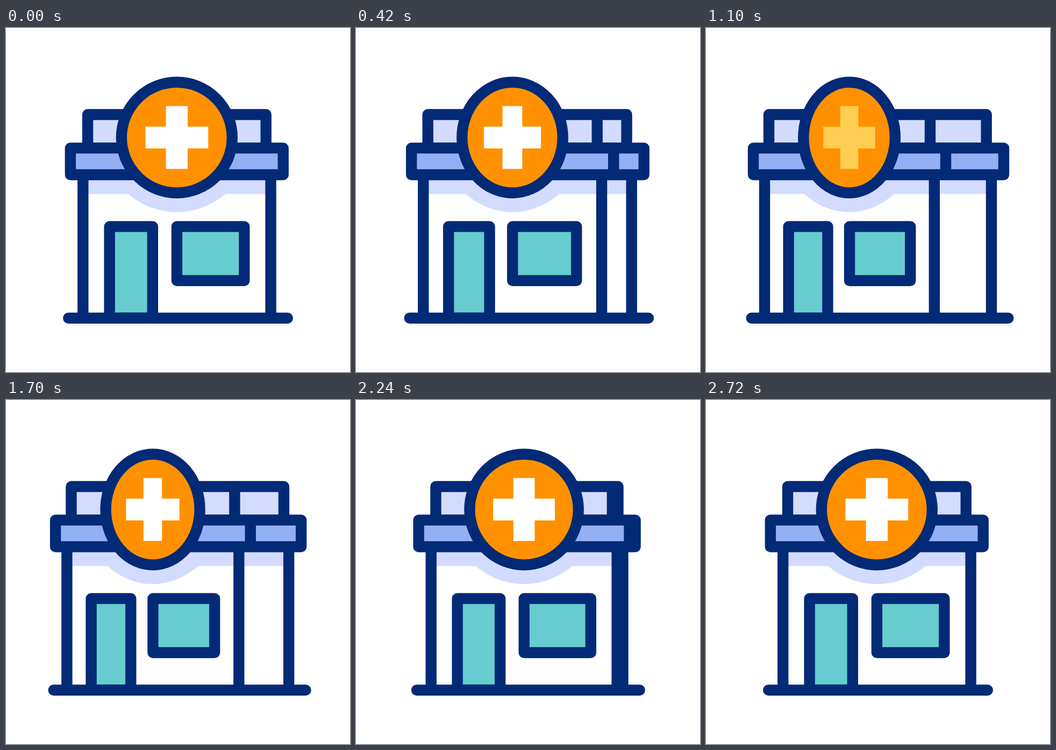
Animation, 640 px wide and 640 px high, one loop 3.6 s. Source, as an HTML page:

```html
<!DOCTYPE html>
<html lang="en">
<head>
<meta charset="utf-8">
<title>Pharmacy</title>
<style>
  html, body { margin: 0; width: 100%; height: 100%; overflow: hidden; background: #fff; }
  svg { display: block; width: 100%; height: 100%; }
  .line { fill: none; stroke: #032a76; stroke-width: 20.4; stroke-linecap: round; stroke-linejoin: round; }
  .pale { fill: #d3dcfe; }
  .blue { fill: #93b0f3; }
  .teal { fill: #67ccd0; }
  .orange { fill: #ff9100; }
</style>
</head>
<body>
<svg viewBox="0 0 640 640">
  <path id="shadow" class="pale"/>
  <path id="pillars" class="line"/>
  <path id="attic" class="line pale"/>
  <path id="ledge" class="line blue"/>
  <path id="door" class="line teal"/>
  <path id="shopWindow" class="line teal"/>
  <path id="ground" class="line"/>
  <ellipse id="sign" class="line orange" cy="203.75" ry="103"/>
  <path id="cross" d="M-20.2 -58.4h40.4v38.2h38.2v40.4h-38.2v38.2h-40.4v-38.2h-38.2v-40.4h38.2z"/>
</svg>
<script>
const LOOP = 3600, STEP = 20;
const $ = id => document.getElementById(id);
const draw = (id, d) => $(id).setAttribute('d', d);

// Cubic timing curve with control points (x1, 0) and (x2, 1)
function ease(x, x1, x2) {
  if (x <= 0) return 0;
  if (x >= 1) return 1;
  let lo = 0, hi = 1;
  for (let i = 0; i < 30; i++) {
    const u = (lo + hi) / 2, v = 1 - u;
    if (3 * v * v * u * x1 + 3 * v * u * u * x2 + u * u * u < x) lo = u; else hi = u;
  }
  return lo * lo * (3 - 2 * lo);
}

const turnAt = t => ease(t / 1100, 0.333, 0.32) - ease((t - 1520) / 1200, 0.304, 0.145);

const box = (left, right, top, bottom) => `M${left} ${top}H${right}V${bottom}H${left}Z`;
const post = (x, top, bottom) => `M${x} ${top}V${bottom}`;

function render(t) {
  const turn = turnAt(t);
  const mix = (front, turned) => front + (turned - front) * turn;

  const leftWall = mix(143.2, 109), corner = mix(492.6, 424.8), rightWall = mix(492.6, 531);
  const cx = mix(317.8, 266.6), rx = mix(103, 85.3);

  const shadowRx = mix(138.8, 127.5), half = shadowRx * 0.6537;
  draw('shadow', `M${leftWall} 273H${rightWall}V308.7H${cx + half}` +
    `A${shadowRx} 138.8 0 0 1 ${cx - half} 308.7H${leftWall}Z`);
  draw('pillars', [leftWall, corner, rightWall].map(x => post(x, 273, 539.7)).join(''));

  draw('attic', box(mix(152, 117), mix(483.7, 521.7), 161, 223.4) + post(mix(483.7, 417), 161, 223.4));
  draw('ledge', box(mix(119.8, 88), mix(515.7, 554), 223.4, 273) + post(mix(515.7, 446), 223.4, 273));

  draw('door', box(mix(192.6, 153.6), mix(272.8, 226.4), 369.4, 539.7));
  draw('shopWindow', box(mix(317.9, 267), mix(443.3, 380.2), 369.4, 470));
  draw('ground', `M${mix(116.2, 84.7)} 539.7H${mix(523.8, 562.3)}`);

  $('sign').setAttribute('cx', cx);
  $('sign').setAttribute('rx', rx);
  $('cross').setAttribute('transform', `translate(${cx} 203.75) scale(${rx / 103} 1)`);
  $('cross').setAttribute('fill', t >= 620 && t < 1240 ? '#ffcd52' : '#fff');
}

const start = performance.now();
function tick() {
  const t = (performance.now() - start) % LOOP;
  render(Math.floor(t / STEP) * STEP);
  requestAnimationFrame(tick);
}
tick();
</script>
</body>
</html>
```
